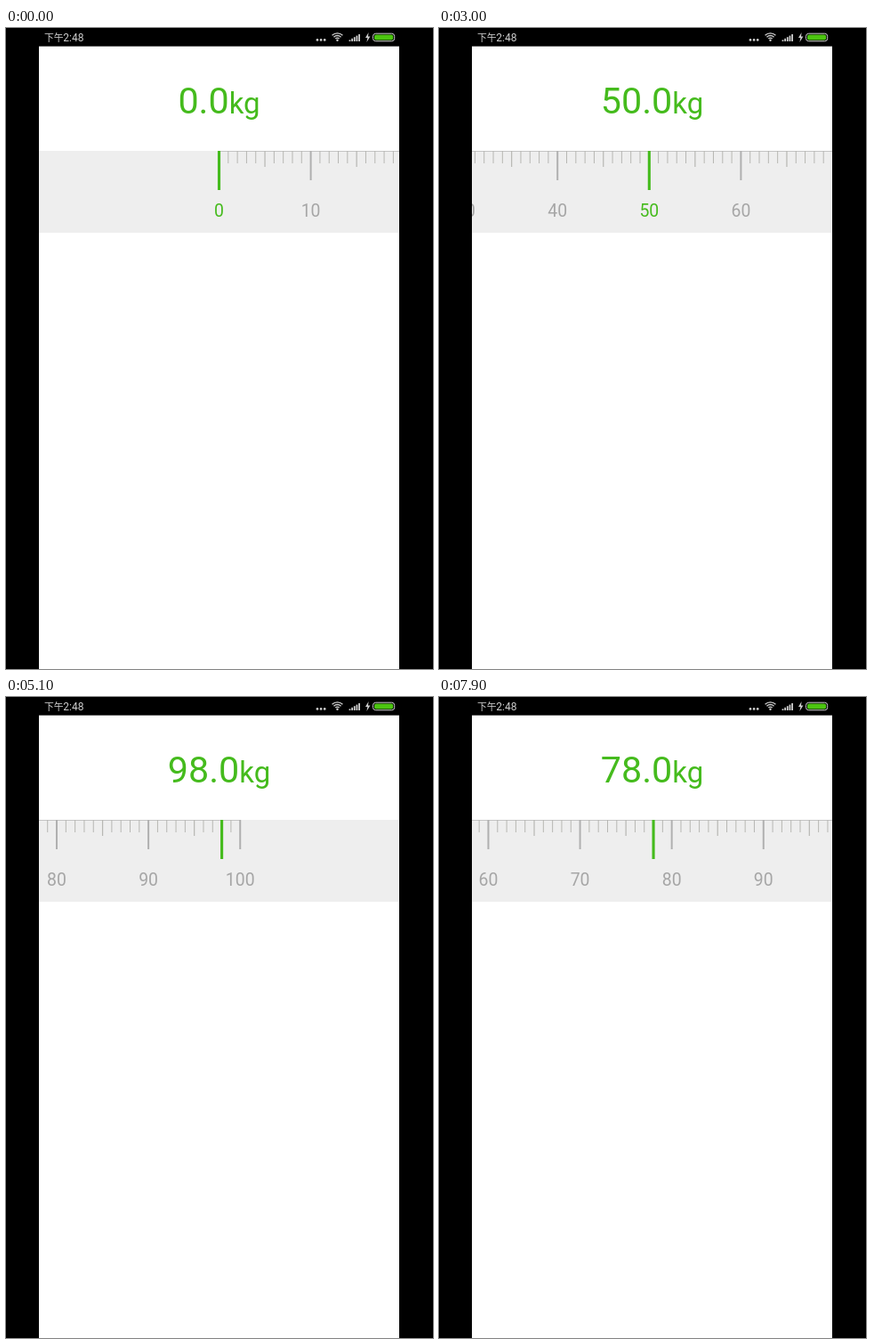
Animation, 480 px wide and 720 px high, one loop 8 s. Source, as an HTML page with a canvas:

```html
<!DOCTYPE html>
<html lang="zh">
<head>
<meta charset="utf-8">
<title>Weight ruler</title>
<style>
html, body { margin: 0; width: 100%; height: 100%; overflow: hidden; background: #000; }
canvas { display: block; width: 480px; height: 720px; }
</style>
</head>
<body>
<canvas id="stage" width="480" height="720"></canvas>
<script>
const ctx = document.getElementById('stage').getContext('2d');
const LOOP = 8000, STEP = 100, TEXT_LAG = 30;
const LEFT = 37, RIGHT = 442, WIDTH = RIGHT - LEFT, MID = 239.5;
const RULER_TOP = 138, RULER_HEIGHT = 92, GAP = 10.31, MAX = 100;
const GREEN = '#45bb1d';

// Turning points of the drags: [time in ms, kg]
const path = [
  [0, 0], [400, 0], [700, 3], [1100, 3], [1400, 22.3], [1500, 23.1],
  [3000, 50.31], [3700, 74], [3900, 67.62], [4050, 64], [4700, 81.3],
  [5000, 98.2], [5100, 97.7], [5900, 77], [6700, 100], [7100, 100], [7900, 77.85]
];

const slope = i => (path[i + 1][1] - path[i][1]) / (path[i + 1][0] - path[i][0]);

function tangent(i) {
  if (i === 0 || i === path.length - 1) return 0;
  const a = slope(i - 1), b = slope(i);
  return a * b <= 0 ? 0 : 2 * a * b / (a + b);
}

// Monotone cubic between the turning points
function valueAt(t) {
  const next = path.findIndex(p => p[0] >= t);
  const i = Math.max(0, next - 1);
  const [t0, v0] = path[i], [t1, v1] = path[i + 1];
  const h = t1 - t0, u = Math.max(0, (t - t0) / h), w = 1 - u;
  return v0 * (1 + 2 * u) * w * w + v1 * u * u * (3 - 2 * u)
    + h * u * w * (tangent(i) * w - tangent(i + 1) * u);
}

function rect(x, y, w, h, color) {
  ctx.fillStyle = color;
  ctx.fillRect(x, y, w, h);
}

function text(str, x, y, size, color, align = 'left', family = 'Roboto') {
  ctx.font = `${size}px ${family}, sans-serif`;
  ctx.textAlign = align;
  ctx.fillStyle = color;
  ctx.fillText(str, x, y);
}

function textWidth(str, size) {
  ctx.font = `${size}px Roboto, sans-serif`;
  return ctx.measureText(str).width;
}

function disc(x, y, r) {
  ctx.beginPath();
  ctx.arc(x, y, r, 0, Math.PI * 2);
  ctx.fill();
}

function pill(x, y, w, h, r) {
  ctx.beginPath();
  ctx.roundRect(x, y, w, h, r);
}

function drawStatusBar() {
  const ink = '#cfcfcf';
  text('下午', 43, 15, 10.8, ink, 'left', '"Noto Sans CJK SC", "Noto Sans CJK"');
  text('2:48', 64.3, 15, 12, ink);

  ctx.fillStyle = ink;
  for (let i = 0; i < 3; i++) disc(350 + i * 4.1, 13.4, 1.35);

  ctx.strokeStyle = ink;
  ctx.lineWidth = 1.3;
  for (let r = 3; r < 9; r += 2.7) {
    ctx.beginPath();
    ctx.arc(372.5, 14.2, r, -Math.PI * 0.75, -Math.PI * 0.25);
    ctx.stroke();
  }
  disc(372.5, 13.8, 1.2);

  for (let i = 0; i < 5; i++) {
    const h = 1.6 + i * 1.6;
    rect(385.6 + i * 2.65, 15 - h, 1.8, h, ink);
  }

  ctx.fill(new Path2D('M407.6 5 L404 11 H406.4 L405.4 16 L409.4 9.4 H407 Z'));

  ctx.lineWidth = 1;
  pill(412.5, 6.2, 24.2, 8.6, 3.2);
  ctx.stroke();
  ctx.fillStyle = '#4cc410';
  pill(414, 7.6, 21.2, 5.8, 2);
  ctx.fill();
}

function drawReading(kg) {
  const num = kg.toFixed(1), big = 41.25, small = 33, base = 96.2;
  const numW = textWidth(num, big);
  const x = MID - (numW + textWidth('kg', small)) / 2;
  text(num, x, base, big, GREEN);
  text('kg', x + numW, base, small, GREEN);
}

function drawRuler(value) {
  const xOf = n => MID + (n - value) * GAP;
  const current = Math.round(value);
  ctx.save();
  ctx.beginPath();
  ctx.rect(LEFT, RULER_TOP, WIDTH, RULER_HEIGHT);
  ctx.clip();
  rect(LEFT, RULER_TOP, WIDTH, RULER_HEIGHT, '#eee');
  rect(xOf(0), RULER_TOP, MAX * GAP, 1, '#c4c4c4');
  // Marks appear once their centre has passed the right edge
  for (let n = 0; n <= MAX && xOf(n) < RIGHT; n++) {
    const x = xOf(n), ten = n % 10 === 0;
    const [w, h] = ten ? [2, 33] : n % 5 === 0 ? [1.2, 18] : [1, 14];
    if (n !== current) rect(x - w / 2, RULER_TOP, w, h, ten ? '#b0b0b0' : '#b7b7b3');
    if (ten) text(n, x, 211.8, 19.4, n === current ? GREEN : '#a6a6a6', 'center');
  }
  rect(xOf(current) - 1.55, RULER_TOP, 3.1, 44, GREEN);
  ctx.restore();
}

function draw(t) {
  rect(0, 0, 480, 720, '#000');
  rect(LEFT, 20.6, WIDTH, 700, '#fff');
  drawStatusBar();
  drawReading(Math.round(valueAt(t - TEXT_LAG)));
  drawRuler(valueAt(t));
}

const start = performance.now();
function tick() {
  const t = Math.max(0, performance.now() - start) % LOOP;
  draw(Math.floor(t / STEP) * STEP);
  requestAnimationFrame(tick);
}
tick();
</script>
</body>
</html>
```
